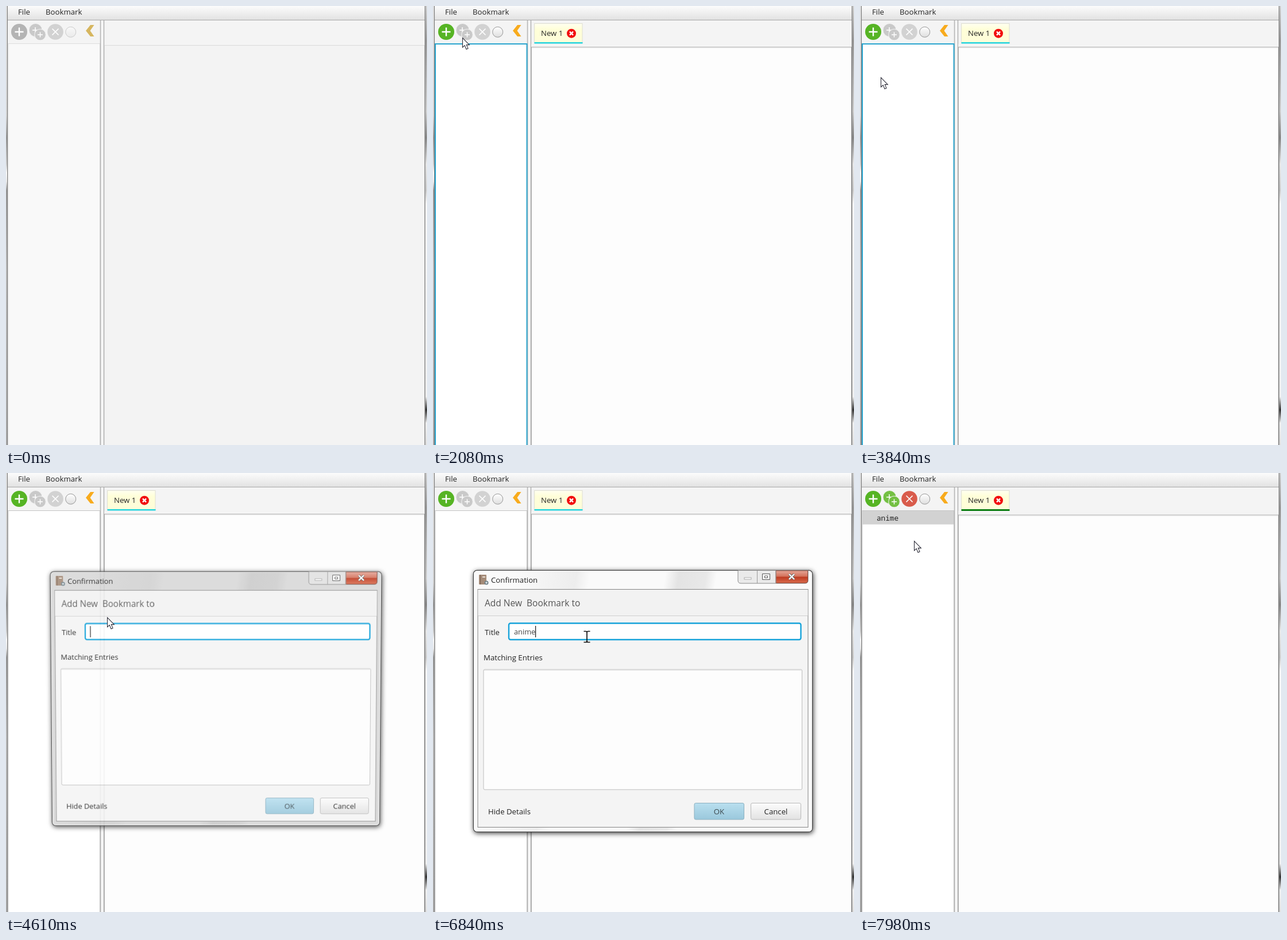
Recreate the animation shown at these times as an HTML page. Size 733 by 764 pixels, loop 8 s.

```html
<!DOCTYPE html>
<html lang="en">
<head>
<meta charset="utf-8">
<title>Bookmark manager</title>
<style>
  html, body { margin: 0; width: 100%; height: 100%; overflow: hidden; background: #f4f4f4; }
  #stage { position: relative; width: 733px; height: 764px; max-width: 100vw; max-height: 100vh; overflow: hidden; contain: strict; }
  svg { position: absolute; left: 0; top: 0; width: 733px; height: 764px; }
  #pointer { width: 14px; height: 22px; overflow: visible; }
  text { font: 13.2px "Open Sans", "Noto Sans", sans-serif; fill: #222; white-space: pre; }
  .mono { font: 12.7px "Noto Sans Mono", monospace; }
  #dialog { transform-origin: 365.5px 397px; }
  #app { --add: #b4b4b4; --multi: #c9c9c9; --del: #d2d2d2; --chevron: #d6b65f; --list: #f9f9f9; --line: #ddd; --radio: .45; }
  #app.opened { --add: #56b424; --chevron: #f8ab1d; --list: #fff; --line: #c4c4c4; --radio: 1; }
  #app.saved { --multi: #74c043; --del: #d95c4c; }
  .when-opened, .when-saved, #focus, #menu { visibility: hidden; }
  .opened .when-opened, .saved .when-saved, .focus #focus, .menu #menu { visibility: visible; }
  #underline { fill: #1dd3dc; }
  .saved #underline { fill: #0b7d12; height: 3px; }
  .saved #editor { transform: translateY(1.5px); }
  .glyph { stroke: #fff; fill: none; }
</style>
</head>
<body>
<div id="stage">
<svg id="app">
  <defs>
    <linearGradient id="bar" x2="0" y2="1"><stop stop-color="#fcfcfc"/><stop offset="1" stop-color="#e2e2e2"/></linearGradient>
    <linearGradient id="deskLeft" x2="0" y2="1">
      <stop stop-color="#ddd"/><stop offset=".25" stop-color="#d4d4d4"/><stop offset=".3" stop-color="#999"/>
      <stop offset=".36" stop-color="#ccc"/><stop offset=".38" stop-color="#fff"/><stop offset=".4" stop-color="#eee"/>
      <stop offset=".42" stop-color="#999"/><stop offset=".6" stop-color="#bbb"/><stop offset="1" stop-color="#aaa"/>
    </linearGradient>
    <linearGradient id="deskRight" x2="0" y2="1">
      <stop stop-color="#ccc"/><stop offset=".08" stop-color="#999"/><stop offset=".24" stop-color="#ccc"/>
      <stop offset=".3" stop-color="#888"/><stop offset=".36" stop-color="#e4e4e4"/><stop offset=".42" stop-color="#ccc"/>
      <stop offset=".45" stop-color="#f4f4f4"/><stop offset=".89" stop-color="#eee"/><stop offset=".92" stop-color="#333"/>
      <stop offset=".95" stop-color="#eee"/><stop offset="1" stop-color="#ddd"/>
    </linearGradient>
    <linearGradient id="ball" x2="0" y2="1"><stop stop-color="#fff"/><stop offset="1" stop-color="#dedede"/></linearGradient>
    <linearGradient id="cream" x2="0" y2="1"><stop stop-color="#fffff0"/><stop offset=".3" stop-color="#ffffd8"/><stop offset="1" stop-color="#fefcd9"/></linearGradient>
  </defs>
  <rect width="4" height="764" fill="url(#deskLeft)"/>
  <rect x="729" width="4" height="764" fill="url(#deskRight)"/>
  <rect x="2.5" y="-1" width="727" height="766" fill="#f4f4f4" stroke="#737373"/>
  <rect x="3" width="726" height="24" fill="url(#bar)"/>
  <path d="M3 24.5H729" stroke="#a9a9a9"/>
  <text x="21" y="15">File</text>
  <text x="69" y="15">Bookmark</text>

  <circle cx="23" cy="45" r="14" fill="var(--add)"/>
  <path class="glyph" stroke-width="2.4" d="M15.500 45H30.500M23 37.500V52.500"/>
  <g fill="var(--multi)" stroke="#f4f4f4">
    <circle cx="51.500" cy="42" r="11.500"/><path class="glyph" stroke-width="1.500" d="M46 42H56M51 37V47"/>
    <circle cx="59.500" cy="50" r="9.800"/><path class="glyph" stroke-width="1.500" d="M55 50H64M59.500 45.500V54.500"/>
  </g>
  <circle cx="86" cy="45" r="13.800" fill="var(--del)"/>
  <path class="glyph" stroke-width="1.700" d="M80.500 39.500L91.500 50.500M91.500 39.500L80.500 50.500"/>
  <circle cx="112.700" cy="45.300" r="9" fill="url(#ball)" stroke="#969696" opacity="var(--radio)"/>
  <path d="M147 33H153.500L146.500 43L153.500 53H147L139 43Z" fill="var(--chevron)"/>

  <rect x="4" y="65.500" width="159.500" height="700" fill="var(--list)" stroke="var(--line)"/>
  <g class="when-saved">
    <rect x="4" y="66" width="159" height="23.500" fill="#d2d2d2"/>
    <text class="mono" x="29" y="82.500">anime</text>
  </g>
  <rect x="164" y="25" width="7" height="739" fill="#f0f0f0"/>
  <path d="M164.500 25V764M170.500 25V764" stroke="#b4b4b4" stroke-width="1.500"/>
  <path d="M167.500 25V764" stroke="#fafafa" stroke-width="2"/>
  <rect id="focus" x="4" y="66" width="159.500" height="702" fill="none" stroke="#2aa5cf" stroke-width="2"/>

  <rect x="171.500" y="68.500" width="557" height="700" fill="#f3f3f3" stroke="#dadada"/>
  <g class="when-opened">
    <rect x="171" y="66" width="558" height="8" fill="#f4f4f4"/>
    <g id="editor">
      <rect x="171.500" y="71.500" width="557" height="700" fill="#fdfdfd" stroke="#b0b0b0"/>
      <path d="M172 73H728" stroke="#e6e6e6"/>
    </g>
    <rect x="176.500" y="30.500" width="83.500" height="34" fill="url(#cream)" stroke="#deded0"/>
    <rect id="underline" x="176.500" y="63" width="84" height="2.400"/>
    <text x="188" y="52">New 1</text>
    <circle cx="241" cy="47.700" r="8" fill="#f20d0d"/>
    <path class="glyph" stroke-width="2.400" d="M238 44.700L244 50.700M244 44.700L238 50.700"/>
  </g>

  <g id="menu">
    <rect x="3.500" y="24.500" width="264" height="366" fill="#f5f5f5" stroke="#bbb" style="filter:drop-shadow(1px 3px 4px #0005)"/>
  </g>
</svg>

<svg id="dialog">
  <defs>
    <linearGradient id="blue" x2="0" y2="1"><stop stop-color="#b9dfef"/><stop offset="1" stop-color="#9ac8dc"/></linearGradient>
    <linearGradient id="red" x2="0" y2="1"><stop stop-color="#e5a596"/><stop offset=".48" stop-color="#d37059"/><stop offset=".5" stop-color="#bd3a20"/><stop offset="1" stop-color="#d86a4c"/></linearGradient>
    <linearGradient id="streaks" x2="1" y2=".12">
      <stop offset=".12" stop-color="#aaa" stop-opacity="0"/><stop offset=".3" stop-color="#aaa" stop-opacity=".16"/>
      <stop offset=".34" stop-color="#aaa" stop-opacity="0"/><stop offset=".56" stop-color="#aaa" stop-opacity="0"/>
      <stop offset=".6" stop-color="#aaa" stop-opacity=".28"/><stop offset=".68" stop-color="#aaa" stop-opacity=".22"/>
      <stop offset=".71" stop-color="#aaa" stop-opacity="0"/>
    </linearGradient>
  </defs>
  <rect id="frame" x="70.500" y="169.500" width="590" height="455" rx="6" stroke="#484848" stroke-width="1.400"/>
  <rect x="71.500" y="170.500" width="588" height="453" rx="5" fill="url(#streaks)" stroke="#fff" stroke-opacity=".8"/>
  <rect x="80" y="177" width="13" height="17" rx="1" fill="#a58c79"/>
  <path d="M82.500 177V194" stroke="#765f50"/><path d="M86 181H91" stroke="#e8ddd2" stroke-width="2"/>
  <circle cx="93" cy="191" r="3.500" fill="#70828a"/><path class="glyph" d="M91 191H95M93 189V193"/>
  <text x="101" y="191">Confirmation</text>

  <path d="M531 169.500V187Q531 192 536 192H648Q653 192 653 187V169.500Z" fill="#e4e4e4" fill-opacity=".75" stroke="#888"/>
  <path id="close" d="M597 170V191.500H648Q652.500 191.500 652.500 187V170Z" fill="url(#red)" stroke="#7c3528" stroke-width=".8"/>
  <path d="M564.500 170V192M597 170V192" stroke="#999"/>
  <rect x="542" y="182" width="12" height="3" fill="#fff" stroke="#999" stroke-width=".8"/>
  <path d="M573.500 175.500H586.500V185.500H573.500ZM577.500 179H582.500V182.500H577.500Z" fill="#fff" stroke="#555"/>
  <path d="M620 176L629 185M629 176L620 185" stroke="#666" stroke-width="4.200"/>
  <path class="glyph" d="M620 176L629 185M629 176L620 185" stroke-width="2.400"/>

  <rect x="78" y="202.500" width="575" height="414" fill="#f4f4f4" stroke="#858585"/>
  <rect x="78.500" y="203" width="574" height="45" fill="#f2f2f2"/>
  <path d="M79 248.500H652" stroke="#cfcfcf"/>
  <text x="90" y="232" style="font-size:15.500px;fill:#555">Add New  Bookmark to</text>
  <text x="90" y="282">Title</text>
  <rect x="132" y="261.500" width="508.500" height="28.500" rx="3" fill="#fff" stroke="#16a3da" stroke-width="2.400"/>
  <text id="typed" x="141" y="281" style="font-size:12.800px;fill:#444"></text>
  <path id="caret" d="M141.300 266V286" stroke="#222" stroke-width="1.300"/>
  <text x="88" y="326">Matching Entries</text>
  <rect x="88" y="342" width="554.500" height="209" rx="2" fill="#fdfdfd" stroke="#bdbdbd"/>
  <path d="M89 343.500H641" stroke="#e8e8e8"/>
  <text x="96" y="594">Hide Details</text>
  <rect x="455" y="574.500" width="86.500" height="28.500" rx="2.500" fill="url(#blue)" stroke="#8cb0c0"/>
  <text x="498" y="594" text-anchor="middle" style="fill:#3d4a50">OK</text>
  <rect x="553.500" y="574.500" width="87" height="28.500" rx="2.500" fill="url(#bar)" stroke="#b9b9b9"/>
  <text x="597" y="594" text-anchor="middle">Cancel</text>
</svg>

<svg id="pointer">
  <path id="arrow" d="M.5 .5V17L4.200 13.600L7 20.200L10 18.900L7.300 12.600H12.300Z" fill="#fff" stroke="#2c2c38" stroke-width="1.100"/>
  <path id="beam" d="M-5.500 -9.500H-2Q0 -9.500 0 -7.500Q0 -9.500 2 -9.500H5.500M0 -8V8M-5.500 9.500H-2Q0 9.500 0 7.500Q0 9.500 2 9.500H5.500" fill="none" stroke="#111" stroke-width="1.700"/>
</svg>
</div>

<script>
const LOOP = 8000;
const MENU = 1440, OPENED = 1890, SHOW = 4500, SAVED = 7100, HIDDEN = 7350;
const $ = id => document.getElementById(id);
const clamp = v => Math.max(0, Math.min(1, v));
const show = (id, on) => $(id).style.visibility = on ? 'visible' : 'hidden';

['New', 'Open', 'Save', 'Save As', 'Save All', 'Rename', 'Close', 'Close All', 'Print', 'Settings', 'About', 'Exit'].forEach((label, i) => {
  $('menu').insertAdjacentHTML('beforeend', `<text x="26" y="${45 + i * 30}">${label}</text>`);
});

// Pointer stops: time, x, y
const stops = [
  [250, 330, 330], [890, 44, 12], [1000, 44, 12], [1110, 20, 12], [1440, 26, 12], [1660, 46, 42],
  [1890, 51, 55], [2090, 51, 55], [2640, 309, 260], [2750, 312, 295], [3080, 312, 295],
  [3830, 36, 124], [3940, 36, 124], [4240, 22, 42], [4380, 22, 42], [4600, 176, 251], [4620, 176, 251],
  [4800, 205, 334], [4900, 205, 334], [5150, 268, 285], [7690, 268, 285], [7970, 94, 118], [LOOP, 94, 118]
];

function pointerAt(t) {
  const i = Math.max(1, stops.findIndex(s => s[0] > t));
  const [t0, x0, y0] = stops[i - 1], [t1, x1, y1] = stops[i];
  const p = clamp((t - t0) / (t1 - t0)), e = p * p * (3 - 2 * p);
  return [x0 + (x1 - x0) * e, y0 + (y1 - y0) * e];
}

function drawApp(t) {
  const states = { menu: t >= MENU && t < OPENED, opened: t >= OPENED, focus: t >= OPENED && t < SHOW, saved: t >= SAVED };
  for (const name in states) $('app').classList.toggle(name, states[name]);
}

function drawDialog(t, visible) {
  $('dialog').style.display = visible ? '' : 'none';
  if (!visible) return;
  const rest = (1 - clamp((t - SHOW) / 220)) ** 2;
  const leave = clamp((t - SAVED) / (HIDDEN - SAVED));
  const active = t < SAVED;
  $('dialog').style.transform =
    `translateY(${-12 * rest - 2 * leave}px) perspective(1000px) rotateX(${-6.4 * rest}deg) scale(${1 - .116 * rest - .044 * leave})`;
  $('dialog').style.opacity = (1 - rest ** 1.6) * (1 - leave * leave);
  $('frame').style.fill = rest > 0 ? '#d8d8d8' : active ? '#fafafa' : '#ebebeb';
  $('frame').style.filter = `drop-shadow(1px 2px ${active ? 4 : 1}px rgba(0,0,0,${active ? .75 : .25}))`;
  show('close', active);

  const word = 'anime'.slice(0, Math.max(0, Math.ceil((t - 5830) / 180)));
  $('typed').textContent = word;
  const end = word ? $('typed').getComputedTextLength() : 0;
  $('caret').setAttribute('transform', `translate(${end} 0)`);
  show('caret', t < 4970 || t >= 5470);
}

function drawPointer(t, dialogOpen) {
  const [x, y] = pointerAt(t);
  const overField = x > 132 && x < 640 && y > 262 && y < 290;
  const overEditor = t >= OPENED && x > 172 && y > 74;
  const beam = dialogOpen ? overField : overEditor;
  show('pointer', t >= 250);
  $('pointer').style.transform = `translate(${x}px, ${y}px)`;
  $('arrow').style.display = beam ? 'none' : '';
  $('beam').style.display = beam ? '' : 'none';
}

function draw() {
  const t = performance.now() % LOOP;
  const dialogOpen = t >= SHOW && t < HIDDEN;
  drawApp(t);
  drawDialog(t, dialogOpen);
  drawPointer(t, dialogOpen);
  requestAnimationFrame(draw);
}
draw();
</script>
</body>
</html>
```
